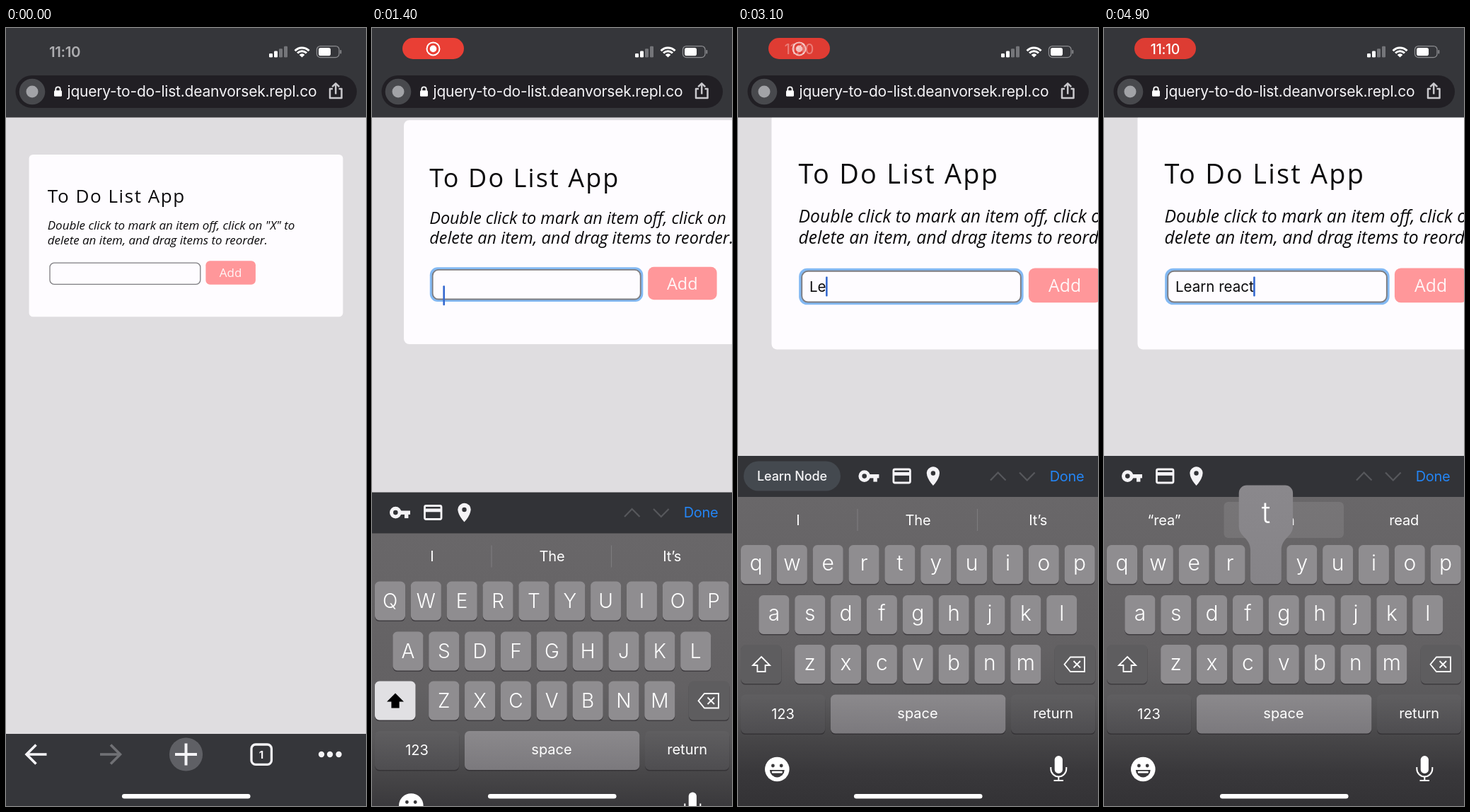
These frames come from a looping animation (509x1100 px, 5000 ms). An HTML page with a canvas:

```html
<!DOCTYPE html>
<html lang="en">
<head>
<meta charset="utf-8">
<title>To Do List App</title>
<style>
html, body { margin: 0; width: 100%; height: 100%; overflow: hidden; background: #35363a; }
canvas { display: block; width: 509px; height: 1100px; }
</style>
</head>
<body>
<canvas id="stage"></canvas>
<script>
const W = 509, H = 1100, LOOP = 5000, STEP = 100;
const canvas = document.getElementById('stage');
const dpr = window.devicePixelRatio || 1;
canvas.width = W * dpr;
canvas.height = H * dpr;
const c = canvas.getContext('2d');

const UI = 'Inter, Roboto, sans-serif';
const PAGE = '"Open Sans", "Noto Sans", sans-serif';
const BAR = '#35363a', INK = '#f4f3f6';
const FOCUS = 1200;          // tap on the input
const KB_TOP = 605;

// Text typed so far: character and the moment it lands
const TYPED = [['L', 2800], ['e', 3100], ['a', 3300], ['r', 3500], ['n', 3700], [' ', 3900],
               ['r', 4100], ['e', 4300], ['a', 4500], ['c', 4700], ['t', 4900]];
const HINTS = [[0, ['I', 'The', 'It’s']], [3500, ['“Lea”', 'Leave', 'Leaving']],
               [3900, ['how', 'more', 'to']], [4700, ['“rea”', 'ran', 'read']]];

const clamp = v => Math.max(0, Math.min(1, v));
const ramp = (t, a, b) => clamp((t - a) / (b - a));
const mix = (a, b, p) => a + (b - a) * p;
// Critically damped spring, t in ms
const spring = (t, w) => t <= 0 ? 0 : 1 - (1 + w * t / 1000) * Math.exp(-w * t / 1000);

function box(x, y, w, h, r, fill) {
  c.beginPath();
  c.roundRect(x, y, w, h, r);
  if (fill) { c.fillStyle = fill; c.fill(); }
}
function stroke(color, width) {
  c.strokeStyle = color;
  c.lineWidth = width;
  c.stroke();
}
function line(points, color, width) {
  c.beginPath();
  for (let i = 0; i < points.length; i += 2) c.lineTo(points[i], points[i + 1]);
  stroke(color, width);
}
function disc(x, y, r, fill) {
  c.beginPath();
  c.arc(x, y, r, 0, 7);
  c.fillStyle = fill;
  c.fill();
}
function text(str, x, y, font, color, align = 'left', spacing = 0) {
  c.font = font;
  c.fillStyle = color;
  c.textAlign = align;
  c.letterSpacing = spacing + 'px';
  c.fillText(str, x, y);
}
function fade(alpha, draw) {
  c.save();
  c.globalAlpha = alpha;
  draw();
  c.restore();
}

function drawPage(t) {
  const p = spring(t - FOCUS, 16.4);
  const scale = 1 + 0.455 * p;
  c.fillStyle = '#dfdde0';
  c.fillRect(0, 126, W, 872);
  c.save();
  c.translate(0, -139.6 * p);
  c.scale(scale, scale);
  box(32.6, 179, 443.8, 229.3, 5.5, '#fefcff');
  text('To Do List App', 58.8, 247.4, '26px ' + PAGE, '#0b0a0c', 'left', 1.55);
  const note = 'italic 17px ' + PAGE;
  text('Double click to mark an item off, click on "X" to', 58.8, 285, note, '#0b0a0c');
  text('delete an item, and drag items to reorder.', 58.8, 305.6, note, '#0b0a0c');
  if (t > FOCUS) box(59.2, 329.5, 218.2, 35.4, 8, '#83b9f3');
  box(62, 332.2, 212.8, 30.1, 6, '#fefcff');
  stroke('#7d7c80', 1.3);
  box(282.4, 329.2, 70.5, 33.6, 6, '#ff979a');
  text('Add', 317.6, 352.4, '17px ' + PAGE, '#fff5f6', 'center');
  c.restore();
  if (t > FOCUS + STEP) drawEntry(t);
}

function drawEntry(t) {
  const str = TYPED.filter(k => t >= k[1]).map(k => k[0]).join('');
  text(str, 101, 373, '20.5px ' + UI, '#0b0a0c');
  const blinkOff = t >= 1900 && t < 2300;
  if (blinkOff) return;
  const x = str ? 100.5 + c.measureText(str).width : 100.4;
  const y = t < 1500 ? 364.3 : 351.4;
  box(x, y, 2.6, 28, 1, '#3468cf');
}

function drawStatus(t) {
  c.fillStyle = BAR;
  c.fillRect(0, 0, W, 126.5);
  const pill = ramp(t, 0, 300);
  fade(1 - pill, () => text('11:10', 83, 41.2, '600 20.5px ' + UI, '#adadb0', 'center', -0.4));
  fade(pill, () => {
    const phase = (t - 1050) / 1930;
    const glow = clamp(0.6 * (1 - Math.cos(phase * Math.PI * 2)));
    const red = `rgb(${mix(221, 255, glow)},${mix(60, 69, glow)},${mix(51, 58, glow)})`;
    box(43, 14, 87, 30, 15, red);
  });
  const clock = ramp(t, 3000, 3300);
  fade(pill * (1 - clock), () => {
    c.beginPath();
    c.arc(86.5, 29.4, 9, 0, 7);
    stroke('#fff', 2);
    disc(86.5, 29.4, 4.8, '#fff');
  });
  fade(clock, () => text('11:10', 86.5, 36.6, '500 19.5px ' + UI, '#fff', 'center', -0.3));

  for (let i = 0; i < 4; i++) {
    const h = 5.5 + i * 3.4;
    box(372 + i * 7, 41.5 - h, 5, h, 1.2, i < 2 ? '#fff' : '#747579');
  }
  // Wi-Fi fan
  c.lineCap = 'butt';
  for (const [r, w] of [[13.6, 3], [8.8, 3], [2.6, 5.2]]) {
    c.beginPath();
    c.arc(418.5, 41.5, r, -Math.PI * 0.76, -Math.PI * 0.24);
    stroke('#fff', w);
  }
  box(439.5, 25.6, 31.5, 16, 5);
  stroke('#8b8c8f', 1.3);
  box(442, 28, 17, 11.2, 2.8, '#fff');
  box(472.4, 31, 1.8, 5.4, 1, '#8b8c8f');

  // Address bar
  box(13.5, 67, 482.5, 46, 23, '#211f24');
  disc(37, 90, 18.3, '#48494d');
  disc(37, 90, 8.5, '#a2a3a7');
  box(68, 88.2, 11, 8.6, 1.5, '#fff');
  c.beginPath();
  c.arc(73.5, 86.5, 3.2, Math.PI, 0);
  c.lineTo(76.7, 89);
  c.moveTo(70.3, 86.5);
  c.lineTo(70.3, 89);
  stroke('#fff', 1.8);
  text('jquery-to-do-list.deanvorsek.repl.co', 86.5, 97, '21px ' + UI, '#f6f5f8', 'left', -0.2);
  c.lineJoin = 'round';
  line([462, 86, 458, 86, 458, 99, 474.5, 99, 474.5, 86, 470.5, 86], '#c9c8cc', 2.5);
  line([466.2, 93.5, 466.2, 79], '#c9c8cc', 2.5);
  line([461.2, 83.2, 466.2, 78.4, 471.2, 83.2], '#c9c8cc', 2.5);
}

function drawNav() {
  c.fillStyle = BAR;
  c.fillRect(0, 998, W, 102);
  c.lineJoin = 'miter';
  for (const [x, dir, color] of [[27.5, 1, INK], [163, -1, '#707175']]) {
    line([x + dir * 1.5, 1027, x + dir * 30, 1027], color, 3.6);
    line([x + dir * 15, 1013.5, x + dir * 1.5, 1027, x + dir * 15, 1040.5], color, 3.6);
  }
  disc(254.5, 1027, 23.6, '#5f6065');
  line([239, 1027, 270, 1027], INK, 4);
  line([254.5, 1011.5, 254.5, 1042.5], INK, 4);
  box(347, 1013, 28.4, 28.4, 6);
  stroke(INK, 3.3);
  text('1', 361, 1032.6, '700 15px ' + UI, INK, 'center');
  for (const x of [446, 458, 470.5]) disc(x, 1027, 4.2, INK);
}

function drawTools(t) {
  c.fillStyle = '#323337';
  c.fillRect(0, KB_TOP, W, 58);
  c.save();
  if (t >= 3000 && t < 4100) {
    box(8, 612.5, 137, 42, 21, '#44494f');
    text('Learn Node', 76.5, 640, '500 18px ' + UI, '#f6f6f8', 'center', -0.1);
    c.translate(145.4, 0);
  }
  // Key
  c.beginPath();
  c.arc(33.3, 633.6, 5.8, 0, 7);
  stroke(INK, 5);
  box(39, 631, 15, 5.4, 0, INK);
  box(46, 634, 5.4, 7.6, 0, INK);
  // Card
  box(74.5, 624, 23.5, 19, 2);
  stroke(INK, 2.8);
  box(74, 628, 24.5, 4.8, 0, INK);
  // Pin
  c.beginPath();
  c.arc(130.5, 629.5, 9.2, Math.PI * 0.88, Math.PI * 0.12);
  c.quadraticCurveTo(137, 640, 130.5, 647);
  c.quadraticCurveTo(124, 640, 121.8, 632.8);
  c.fillStyle = INK;
  c.fill();
  disc(130.5, 629.5, 3.2, '#323337');
  c.restore();
  line([357, 639.5, 367.6, 628.5, 378.5, 639.5], '#57585c', 2.2);
  line([398, 628.5, 408.8, 639.5, 419.6, 628.5], '#57585c', 2.2);
  text('Done', 465, 641, '20px ' + UI, '#2485f4', 'center', -0.3);
}

function key(x, y, w, fill) {
  box(x, y + 1.6, w, 55, 6.5, 'rgba(40,38,42,.6)');
  box(x, y, w, 55, 6.5, fill);
}

const ROWS = [['qwertyuiop', 4, 731], ['asdfghjkl', 29.4, 802], ['zxcvbnm', 80.2, 872]];
const PITCH = 50.85, KEY_W = 43;
const KEY = '#8f8d90', DARK_KEY = '#5e5d5f';

function drawKeys(t) {
  const upper = t < 2900;
  for (const [letters, x0, y] of ROWS) {
    [...letters].forEach((ch, i) => {
      const x = x0 + i * PITCH;
      key(x, y, KEY_W, KEY);
      if (upper) text(ch.toUpperCase(), x + KEY_W / 2, y + 38, '300 28px ' + UI, '#fff', 'center');
      else text(ch, x + KEY_W / 2, y + 35.5, '300 30px ' + UI, '#fff', 'center');
    });
  }
  // Shift
  key(4, 872, 57.5, upper ? '#e1e0e3' : DARK_KEY);
  c.beginPath();
  for (const [x, y] of [[33, 889], [45, 901], [38.6, 901], [38.6, 910], [27.4, 910], [27.4, 901], [21, 901]]) c.lineTo(x, y);
  c.closePath();
  if (upper) { c.fillStyle = '#000'; c.fill(); }
  else stroke('#fff', 1.8);
  // Backspace
  key(447.8, 872, 57.5, DARK_KEY);
  c.beginPath();
  for (const [x, y] of [[470, 889.5], [490, 889.5], [490, 910], [470, 910], [461.5, 899.7]]) c.lineTo(x, y);
  c.closePath();
  stroke('#fff', 1.8);
  line([474.5, 895, 484, 904.5], '#fff', 1.8);
  line([484, 895, 474.5, 904.5], '#fff', 1.8);
  // Bottom row
  const shade = (top, bottom) => {
    const g = c.createLinearGradient(0, 943, 0, 998);
    g.addColorStop(0, top);
    g.addColorStop(1, bottom);
    return g;
  };
  const dark = shade('#5f5e60', '#4e4d50');
  key(4, 942.5, 119.3, dark);
  key(131, 942.5, 247.3, t === 3800 ? dark : shade('#8b898c', '#7b797d'));
  key(386, 942.5, 119.3, dark);
  text('123', 63.5, 977, '20px ' + UI, '#fff', 'center');
  text('space', 254, 975.5, '20px ' + UI, '#fff', 'center');
  text('return', 445.7, 975.5, '20px ' + UI, '#fff', 'center');
}

function drawHints(t) {
  const words = HINTS.filter(h => t >= h[0]).pop()[1];
  const chosen = t >= 4700;
  if (chosen) box(169.5, 670, 169.5, 51, 6, 'rgba(255,255,255,.09)');
  else for (const x of [169, 338.5]) box(x - 0.6, 680, 1.2, 31, 0, '#7d7b7e');
  words.forEach((w, i) => text(w, 85 + i * 169.6, 703, '20px ' + UI, '#fff', 'center', -0.1));
}

function drawBalloon(t) {
  const last = TYPED[TYPED.length - 1];
  const hit = TYPED.find(k => k[0] !== ' ' && t >= k[1] - STEP && (t < k[1] || k === last));
  if (!hit) return;
  const lower = hit[0].toLowerCase();
  const [letters, x0, y] = ROWS.find(r => r[0].includes(lower));
  const m = x0 + letters.indexOf(lower) * PITCH + KEY_W / 2;
  const k = KEY_W / 2 + 0.3, b = 38.2, top = y - 84.5;
  c.beginPath();
  c.moveTo(m - b + 11, top);
  c.arcTo(m + b, top, m + b, top + 30, 11);
  c.lineTo(m + b, top + 58);
  c.bezierCurveTo(m + b, top + 73, m + k, top + 74, m + k, top + 92);
  c.arcTo(m + k, y + 55, m, y + 55, 6.5);
  c.arcTo(m - k, y + 55, m - k, top + 92, 6.5);
  c.lineTo(m - k, top + 92);
  c.bezierCurveTo(m - k, top + 74, m - b, top + 73, m - b, top + 58);
  c.arcTo(m - b, top, m, top, 11);
  c.closePath();
  const g = c.createLinearGradient(0, top, 0, y + 55);
  g.addColorStop(0, '#8a888c');
  g.addColorStop(1, '#868488');
  c.fillStyle = g;
  c.fill();
  text(hit[0], m, top + 53, '300 42px ' + UI, '#fff', 'center');
}

function drawFooter() {
  disc(55.3, 1048, 17.3, '#fff');
  disc(49.4, 1043, 2.4, '#39383a');
  disc(61.2, 1043, 2.4, '#39383a');
  c.beginPath();
  c.arc(55.3, 1049, 10.4, 0, Math.PI);
  c.closePath();
  c.fillStyle = '#39383a';
  c.fill();
  box(47.8, 1050.8, 15, 2.8, 1, '#fff');
  box(447.7, 1029, 11.2, 25, 5.6, '#fff');
  c.beginPath();
  c.moveTo(442.3, 1045);
  c.lineTo(442.3, 1047.5);
  c.arc(453.3, 1047.5, 11, Math.PI, 0, true);
  c.lineTo(464.3, 1045);
  stroke('#fff', 2);
  line([453.3, 1058.5, 453.3, 1064], '#fff', 2);
  line([446.5, 1064, 460, 1064], '#fff', 2);
}

function drawKeyboard(t) {
  const p = spring(t - FOCUS, 19.2);
  if (!p) return;
  c.save();
  c.translate(0, (1 - p) * (H - KB_TOP));
  const g = c.createLinearGradient(0, 662, 0, H);
  [[0, '#696769'], [0.5, '#636163'], [0.66, '#5a595b'], [0.78, '#474648'], [0.89, '#39383b'], [1, '#333235']]
    .forEach(s => g.addColorStop(...s));
  c.fillStyle = g;
  c.fillRect(0, 662, W, H - 662);
  drawTools(t);
  drawHints(t);
  drawKeys(t);
  drawFooter();
  drawBalloon(t);
  c.restore();
}

function render(t) {
  c.setTransform(dpr, 0, 0, dpr, 0, 0);
  drawPage(t);
  drawStatus(t);
  drawNav();
  drawKeyboard(t);
  box(164, 1083, 181.5, 6.6, 3.3, '#fff');
}

let start;
function tick(now) {
  if (start === undefined) start = now;
  const t = (now - start) % LOOP;
  render(Math.floor(t / STEP) * STEP);
  requestAnimationFrame(tick);
}
render(0);
requestAnimationFrame(tick);
</script>
</body>
</html>
```
